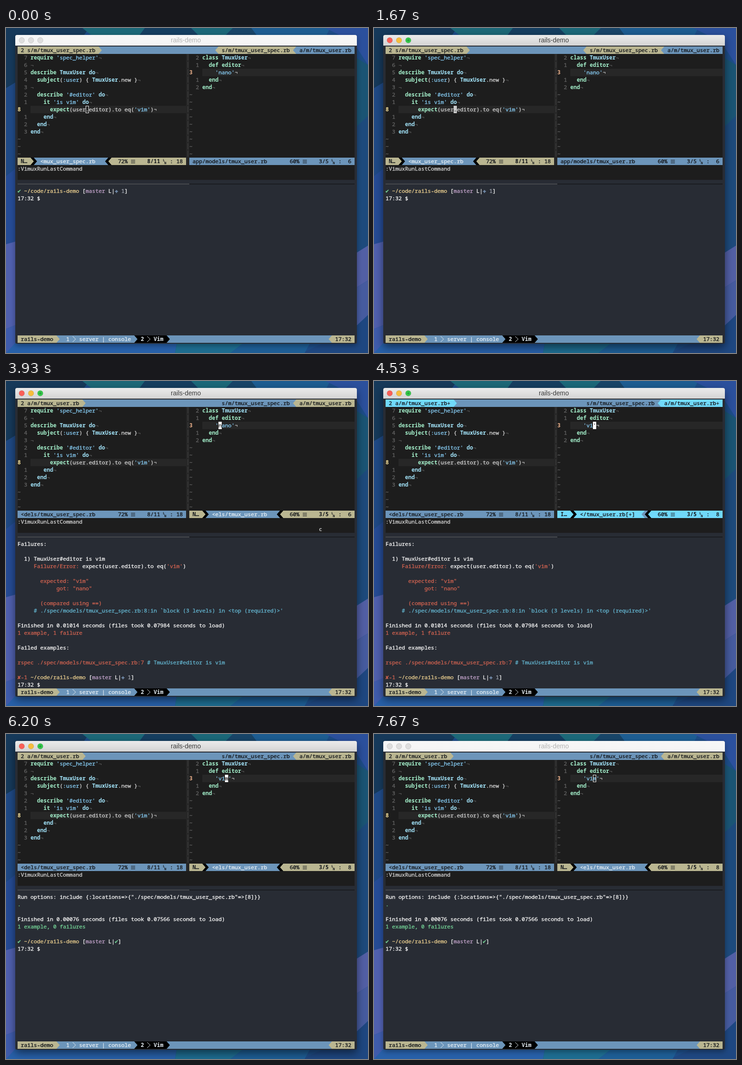
These frames come from a looping animation (782 by 702 pixels, 7.74 s). An HTML page with a canvas:

```html
<!DOCTYPE html>
<html lang="en">
<head>
<meta charset="utf-8">
<title>rails-demo</title>
<style>
html, body { margin: 0; width: 100%; height: 100%; overflow: hidden; background: #1d4a80; }
canvas { display: block; }
</style>
</head>
<body>
<canvas id="stage" width="782" height="702"></canvas>
<script>
const ctx = document.getElementById('stage').getContext('2d');
const LOOP = 7740, CW = 7, RH = 16, LEFT = 25, TOP = 40, RIGHT_PANE = 53;
const MONO = '"Noto Sans Mono", "DejaVu Sans Mono", monospace';
const BLUE = '#6c95ba', TAN = '#bab691', CYAN = '#70d9fa', BLACK = '#000', INK = '#15181c', PALE = '#e2ebf2';
const VIM = '#1d1d1d', TERM = '#282c34';

// Inline colour codes: ^x switches colour; an uppercase code is bold.
const COLORS = {
  K: '#a4f0cb', T: '#a3e4fa', s: '#83c6ec', i: '#cccccc', e: '#606060', E: '#b0b0b0', n: '#626262',
  w: '#f0f0f0', r: '#c8604f', c: '#62b1cb', g: '#72cf94', y: '#e3c88b',
  p: '#bd9fc5', b: '#7893b3', m: '#999fa9', a: INK, A: INK, l: PALE, L: PALE, Y: '#f0dc9a', O: '#f0b48e'
};

// Times of the events, in ms
const FOCUS = 400, RUN1 = 2200, FAIL = 2530, SWITCH = 3530, PENDING = 3860, INSERT = 4130,
  KEYS = [4330, 4470, 4600], ESCAPE = 4800, WRITE = 5130, SAVED = 5270, RUN2 = 5670, PASS = 5930, BLUR = 7400;

const colX = c => LEFT + c * CW;
const rowY = r => TOP + r * RH;

function rect(x, y, w, h, color) {
  ctx.fillStyle = color;
  ctx.fillRect(x, y, w, h);
}

function cells(row, col, count, color) {
  rect(colX(col), rowY(row), count * CW, RH, color);
}

function poly(color, ...p) {
  ctx.fillStyle = color;
  ctx.beginPath();
  for (let i = 0; i < p.length; i += 2) ctx.lineTo(p[i], p[i + 1]);
  ctx.fill();
}

// Powerline separators, one cell wide
function arrow(row, col, dir, color, back) {
  cells(row, col, 1, back);
  const x = colX(col) + (dir < 0 ? CW : 0), y = rowY(row);
  poly(color, x, y, x + dir * CW, y + RH / 2, x, y + RH);
}

function chevron(row, col) {
  const x = colX(col), y = rowY(row);
  ctx.strokeStyle = PALE;
  ctx.lineWidth = 1;
  ctx.beginPath();
  ctx.moveTo(x, y + 2);
  ctx.lineTo(x + 6.5, y + 8);
  ctx.lineTo(x, y + 14);
  ctx.stroke();
}

function glyph(ch, x, y, color, bold) {
  ctx.fillStyle = ctx.strokeStyle = color;
  if (ch === '☰') {
    for (const dy of [5, 8, 11]) ctx.fillRect(x, y + dy, 9, 1);
  } else if (ch === '␤') {
    ctx.font = `700 7px ${MONO}`;
    ctx.fillText('L', x - 1, y + 8);
    ctx.fillText('N', x + 2, y + 14);
  } else {
    ctx.font = `${bold ? 700 : 400} 11.667px ${MONO}`;
    ctx.fillText(ch, x, y + 12);
    if (bold) return;
    // A hairline outline gives the regular face a medium weight
    ctx.lineWidth = .4;
    ctx.strokeText(ch, x, y + 12);
  }
}

function put(row, col, text) {
  let code = 'i';
  for (let i = 0; i < text.length; i++) {
    if (text[i] === '^') { code = text[++i]; continue; }
    if (text[i] !== ' ') glyph(text[i], colX(col), rowY(row), COLORS[code], code < 'a');
    col++;
  }
}

function cursor(row, col, ch, focused, color) {
  if (focused) {
    cells(row, col, 1, color);
    glyph(ch, colX(col), rowY(row), '#333');
  } else {
    ctx.strokeStyle = '#eee';
    ctx.lineWidth = 1;
    ctx.strokeRect(colX(col) + .5, rowY(row) + .5, CW - 1, RH - 1);
  }
}

function wallpaper() {
  rect(0, 0, 782, 702, '#1d4d88');
  poly('#16395a', 0, 0, 180, 0, 165, 20, 25, 115, 0, 130);
  poly('#1c6878', 165, 0, 300, 0, 285, 20, 190, 20);
  poly('#153e60', 300, 0, 400, 0, 420, 20, 285, 20);
  poly('#1b6879', 400, 0, 490, 0, 470, 20, 420, 20);
  poly('#184568', 490, 0, 530, 0, 545, 20, 470, 20);
  poly('#1d5d92', 530, 0, 700, 0, 690, 20, 545, 20);
  poly('#2b509d', 690, 0, 782, 0, 782, 80, 750, 30);
  poly('#1a5474', 782, 80, 782, 190, 750, 220, 750, 60);
  poly('#1d4a7c', 782, 190, 782, 470, 750, 490, 750, 220);
  poly('#525fa5', 782, 470, 782, 545, 750, 565, 750, 490);
  poly('#465b9f', 782, 545, 782, 620, 750, 650, 750, 565);
  poly('#1e4781', 782, 620, 782, 702, 640, 702, 750, 650);
  poly('#1f4985', 0, 130, 25, 115, 25, 300, 0, 320);
  poly('#254b95', 0, 320, 25, 300, 25, 460, 0, 467);
  poly('#5060ae', 0, 467, 25, 460, 25, 640, 0, 650);
  poly('#3f5cac', 0, 650, 25, 640, 25, 690, 0, 702);
  poly('#2760a9', 0, 702, 25, 675, 370, 675, 365, 702);
  poly('#1d6c90', 365, 702, 370, 675, 520, 675, 485, 702);
  poly('#1d5d95', 485, 702, 520, 675, 660, 675, 645, 702);
}

function frame(focused) {
  ctx.save();
  ctx.shadowColor = focused ? 'rgba(0,0,0,.5)' : 'rgba(0,0,0,.35)';
  ctx.shadowBlur = focused ? 18 : 12;
  ctx.shadowOffsetY = focused ? 7 : 4;
  ctx.fillStyle = TERM;
  ctx.beginPath();
  ctx.roundRect(20, 15, 738, 667, 4);
  ctx.fill();
  ctx.restore();

  const shade = ctx.createLinearGradient(0, 15, 0, 38);
  shade.addColorStop(0, focused ? '#ebebeb' : '#f7f7f7');
  shade.addColorStop(1, focused ? '#d3d3d3' : '#f4f4f4');
  ctx.fillStyle = shade;
  ctx.beginPath();
  ctx.roundRect(20, 15, 738, 23, [4, 4, 0, 0]);
  ctx.fill();
  ['#f95f57', '#f6bd3c', '#36c84b'].forEach((color, i) => {
    ctx.fillStyle = focused ? color : '#dedede';
    ctx.strokeStyle = 'rgba(0,0,0,.12)';
    ctx.lineWidth = 1;
    ctx.beginPath();
    ctx.arc(34 + 20 * i, 26.5, 6, 0, 7);
    ctx.fill();
    ctx.stroke();
  });
  if (focused) {
    rect(71, 26, 6, 1, '#1d8733');
    rect(73.5, 23.5, 1, 6, '#1d8733');
  }
  ctx.font = '13.9px "Liberation Sans", sans-serif';
  ctx.textAlign = 'center';
  ctx.fillStyle = focused ? '#3c3c3c' : '#b4b4b4';
  ctx.fillText('rails-demo', 388.5, 31);
  ctx.textAlign = 'left';
}

function tabline(right, modified) {
  const accent = modified ? CYAN : TAN, plus = modified ? '+' : '';
  const spec = 's/m/tmux_user_spec.rb', model = 'a/m/tmux_user.rb' + plus;
  const current = right ? model : spec;
  const modelCol = 103 - model.length, specCol = modelCol - 24;
  cells(0, 0, 104, BLUE);
  cells(0, 0, current.length + 4, accent);
  arrow(0, current.length + 4, 1, accent, BLUE);
  put(0, 1, '^a2 ' + current);
  if (right) {
    arrow(0, modelCol - 2, -1, accent, BLUE);
    cells(0, modelCol - 1, model.length + 2, accent);
  } else {
    arrow(0, specCol - 2, -1, accent, BLUE);
    cells(0, specCol - 1, 23, accent);
    arrow(0, modelCol - 2, -1, BLUE, accent);
  }
  put(0, specCol, '^a' + spec);
  put(0, modelCol, '^a' + model);
}

function status(col, width, o) {
  cells(15, col, width, BLUE);
  if (o.active) {
    const accent = o.insert ? CYAN : TAN, body = o.modified ? accent : BLUE;
    cells(15, col, 4, accent);
    arrow(15, col + 4, 1, accent, BLACK);
    arrow(15, col + 5, 1, BLACK, body);
    cells(15, col + 6, 20, body);
    arrow(15, col + 26, -1, BLUE, body);
    arrow(15, col + 27, -1, BLACK, BLUE);
    arrow(15, col + 28, -1, accent, BLACK);
    cells(15, col + 29, width - 29, accent);
    put(15, col + 1, `^A${o.insert ? 'I' : 'N'}…`);
    put(15, col + 7, (o.modified ? '^a' : '^l') + o.short);
  } else {
    put(15, col + 1, '^a' + o.long);
  }
  put(15, col + 31, `^a${o.percent}% ☰    ${o.active ? '^A' : ''}${o.line} ␤^a : ${String(o.column).padStart(2)}`);
}

const SPEC = [
  "^n  7 ^Krequire ^s'spec_helper'^e¬",
  '^n  6 ^e¬',
  '^n  5 ^Kdescribe ^TTmuxUser do^e¬',
  '^n  4   ^Ksubject^i(^s:user^i) { ^TTmuxUser^i.new }^e¬',
  '^n  3 ^e¬',
  "^n  2   ^Kdescribe ^s'#editor' ^Tdo^e¬",
  "^n  1     ^Kit ^s'is vim' ^Tdo^e¬",
  "^Y8^i         ^Kexpect^i(user.editor).to eq(^s'vim'^i)^E¬",
  '^n  1     ^Tend^e¬',
  '^n  2   ^Tend^e¬',
  '^n  3 ^Tend^e¬'
];

function editor(t, focused) {
  const right = t >= SWITCH, inserting = t >= INSERT && t < ESCAPE;
  const typed = KEYS.filter(k => t >= k).length;
  const word = t < INSERT ? 'nano' : 'vim'.slice(0, typed);
  const modified = t >= INSERT && t < SAVED;
  const offset = t < INSERT ? 0 : inserting ? typed : 2;

  rect(LEFT, TOP, 728, 18 * RH, VIM);
  tabline(right, modified);
  cells(8, 4, 48, '#272727');
  cells(3, RIGHT_PANE + 4, 47, '#272727');
  rect(colX(52), rowY(1), CW, 15 * RH, '#262626');
  for (let r = 1; r < 15; r++) rect(392.5, rowY(r) + 1, 1, 13, '#464646');
  SPEC.forEach((line, i) => put(i + 1, 0, line));
  [
    '^n  2 ^Kclass ^TTmuxUser^e¬',
    '^n  1   ^Kdef editor^e¬',
    `^O3^i       ^s'${word}'^E¬`,
    '^n  1   ^Kend^e¬',
    '^n  2 ^Kend^e¬'
  ].forEach((line, i) => put(i + 1, RIGHT_PANE, line));
  for (let r = 12; r < 15; r++) put(r, 0, '^n~');
  for (let r = 6; r < 15; r++) put(r, RIGHT_PANE, '^n~');

  status(0, 52, {
    active: !right, short: '<mux_user_spec.rb', long: '<dels/tmux_user_spec.rb',
    percent: 72, line: '8/11', column: 18
  });
  status(RIGHT_PANE, 51, {
    active: right, insert: inserting, modified,
    short: modified ? '</tmux_user.rb[+]' : '<els/tmux_user.rb', long: 'app/models/tmux_user.rb',
    percent: 60, line: '3/5', column: 6 + offset
  });
  put(16, 0, t >= WRITE && t < RUN2 ? '"app/models/tmux_user.rb" 5L, 48C written' : ':VimuxRunLastCommand');
  if (t >= PENDING && t < INSERT) put(17, 93, 'c');

  if (!right) cursor(8, 21, '.', focused, '#c9c9c9');
  else if (t < WRITE || t >= SAVED) cursor(3, RIGHT_PANE + 9 + offset, (word + "'")[offset], focused, '#fff');
}

function prompt(row, mark, state) {
  put(row, 0, `${mark} ^y~/code/rails-demo ^w[^pmaster ^wL|${state}^w]`);
  put(row + 1, 0, '^w17:32 $');
}

function terminal(t) {
  if (t < RUN1) {
    prompt(19, '^g✔', '^b✚ ^m1');
  } else if (t >= FAIL && t < RUN2) {
    put(19, 0, '^wFailures:');
    put(21, 2, '^w1) TmuxUser#editor is vim');
    put(22, 5, "^rFailure/Error: ^wexpect(user.editor).to eq(^r'vim'^w)");
    put(24, 7, '^rexpected: "vim"');
    put(25, 12, '^rgot: "nano"');
    put(27, 7, '^r(compared using ==)');
    put(28, 5, "^c# ./spec/models/tmux_user_spec.rb:8:in `block (3 levels) in <top (required)>'");
    put(30, 0, '^wFinished in 0.01014 seconds (files took 0.07984 seconds to load)');
    put(31, 0, '^r1 example, 1 failure');
    put(33, 0, '^wFailed examples:');
    put(35, 0, '^rrspec ./spec/models/tmux_user_spec.rb:7 ^c# TmuxUser#editor is vim');
    prompt(37, '^r✘-1', '^b✚ ^m1');
  } else if (t >= PASS) {
    put(19, 0, '^wRun options: include {:locations=>{"./spec/models/tmux_user_spec.rb"=>[8]}}');
    put(20, 0, '^g.');
    put(22, 0, '^wFinished in 0.00076 seconds (files took 0.07566 seconds to load)');
    put(23, 0, '^g1 example, 0 failures');
    prompt(25, '^g✔', '^g✔');
  }
}

function tmuxBar() {
  rect(LEFT, 336.5, 371, 1, '#666');
  rect(396, 336.5, 357, 1, '#0c0c0c');
  cells(39, 0, 104, BLUE);
  cells(39, 0, 12, TAN);
  arrow(39, 12, 1, TAN, BLUE);
  put(39, 1, '^arails-demo');
  put(39, 15, '^l1   server | console');
  chevron(39, 17);
  arrow(39, 36, 1, BLUE, BLACK);
  cells(39, 37, 9, BLACK);
  arrow(39, 46, 1, BLACK, BLUE);
  put(39, 38, '^L2   Vim');
  chevron(39, 40);
  arrow(39, 96, -1, TAN, BLUE);
  cells(39, 97, 7, TAN);
  put(39, 98, '^a17:32');
}

const start = performance.now();

function draw() {
  const t = (performance.now() - start) % LOOP;
  const focused = t >= FOCUS && t < BLUR;
  wallpaper();
  frame(focused);
  editor(t, focused);
  terminal(t);
  tmuxBar();
  requestAnimationFrame(draw);
}
draw();
</script>
</body>
</html>
```
